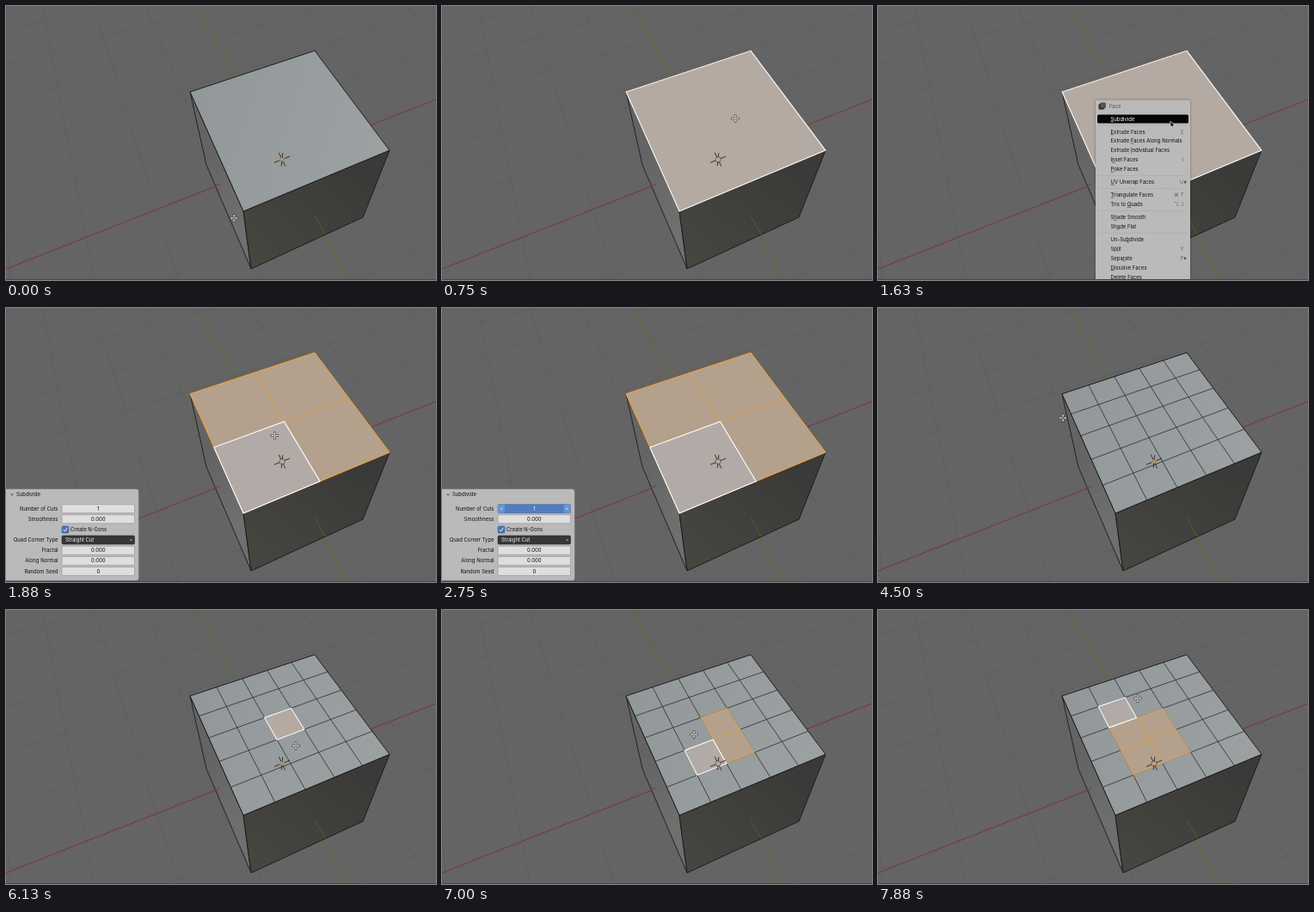
Recreate the animation shown at these times as an HTML page with a canvas. Size 500x319 px, loop 8 s.

```html
<!DOCTYPE html>
<html lang="en">
<head>
<meta charset="utf-8">
<title>Subdividing a cube face</title>
<style>
html, body { margin: 0; width: 100%; height: 100%; overflow: hidden; background: #646464; }
canvas { display: block; }
</style>
</head>
<body>
<canvas id="view" width="500" height="319"></canvas>
<script>
const ctx = document.getElementById('view').getContext('2d');
const LOOP = 8000, STEP = 125;

// Perspective: a plane is an anchor point plus the two shared vanishing points.
const VX = [2119, -530], VY = [-51, -495];
const plane = (o, a, b) => (u, v) =>
  [0, 1].map(k => (o[k] + a * u * VX[k] + b * v * VY[k]) / (1 + a * u + b * v));
const ground = plane([321, 179.4], .0375, .0876);
const lid = plane([276, 239], .1016, .2336);
const A = [214, 100], B = [359, 52], C = [446, 168], D = [276, 239];
const E = [233, 185], F = [415, 246], G = [285, 306];

function path(points, close) {
  ctx.beginPath();
  points.forEach(p => ctx.lineTo(...p));
  if (close) ctx.closePath();
}
function line(points, color, width = 1) {
  path(points);
  ctx.strokeStyle = color;
  ctx.lineWidth = width;
  ctx.stroke();
}
function poly(points, fill, stroke, width = 1) {
  path(points, true);
  if (fill) { ctx.fillStyle = fill; ctx.fill(); }
  if (stroke) { ctx.strokeStyle = stroke; ctx.lineWidth = width; ctx.stroke(); }
}
function box(x, y, w, h, r, fill, stroke) {
  ctx.beginPath();
  ctx.roundRect(x, y, w, h, r);
  ctx.fillStyle = fill;
  ctx.fill();
  if (stroke) { ctx.strokeStyle = stroke; ctx.lineWidth = .6; ctx.stroke(); }
}
function text(str, x, y, color = '#111', align = 'left') {
  ctx.font = '5.95px Inter, "DejaVu Sans", sans-serif';
  ctx.textBaseline = 'middle';
  ctx.textAlign = align;
  ctx.fillStyle = color;
  ctx.fillText(str, x, y + .3);
}
// The letter after "&" is underlined as the shortcut key.
function menuLabel(str, x, y, color = '#111') {
  const [before, after] = str.split('&');
  text(before + after, x, y, color);
  const left = x + ctx.measureText(before).width;
  line([[left, y + 3.2], [left + ctx.measureText(after[0]).width, y + 3.2]], color, .5);
}
function gradient(from, to, c1, c2) {
  const g = ctx.createLinearGradient(...from, ...to);
  g.addColorStop(0, c1);
  g.addColorStop(1, c2);
  return g;
}

// Mouse path: time, x, y
const mouse = [
  [0, 265, 247], [750, 341, 131], [1375, 341, 131], [1625, 340, 134], [1750, 340, 134],
  [2625, 146, 235], [3750, 146, 235], [4500, 215, 128], [4875, 262, 117], [5375, 318, 133],
  [5500, 318, 133], [6125, 337, 158], [6250, 311, 157], [6500, 300, 162], [6625, 300, 162],
  [7000, 293, 145], [7500, 285, 108], [7875, 302, 103], [LOOP, 302, 103]
];
function mouseAt(t) {
  const i = mouse.findIndex(k => k[0] > t);
  const [t0, x0, y0] = mouse[i - 1], [t1, x1, y1] = mouse[i];
  const f = (t - t0) / (t1 - t0);
  return [x0 + (x1 - x0) * f, y0 + (y1 - y0) * f];
}

// Time of each shift-click and the cell it adds
const picks = [[5625, 2, 2], [6250, 2, 1], [6750, 1, 1], [7125, 1, 2], [7500, 1, 3]];

function stateAt(t) {
  const divisions = t < 1875 ? 1 : t < 2875 ? 2 : t < 3250 ? 3 : t < 3750 ? 4 : 5;
  let cells = [];
  if (t >= 500 && t < 4250) {
    for (let i = divisions; i--;) for (let j = divisions; j--;) cells.push([i, j]);
  } else {
    cells = picks.filter(p => t >= p[0]).map(p => p.slice(1));
  }
  return {
    divisions, cells,
    menu: t >= 1000 && t < 1875,
    panel: t >= 1875 && t < 4250,
    pressed: [[2750, 2875], [3000, 3250], [3500, 3750]].some(([a, b]) => t >= a && t < b)
  };
}

function drawFloor() {
  ctx.fillStyle = '#646464';
  ctx.fillRect(0, 0, 500, 319);
  for (let i = -9; i <= 20; i++) {
    line([ground(i, -5), ground(i, 30)], 'rgba(80,80,80,.35)', .8);
    if (i >= -5) line([ground(-9, i), ground(20, i)], 'rgba(80,80,80,.35)', .8);
  }
  line([ground(-9, 0), ground(20, 0)], '#85303f');
  line([ground(0, -5), ground(0, 30)], '#567522');
}

function drawCube({ divisions: n, cells }) {
  poly([A, D, G, E], gradient([225, 180], [275, 250], '#646464', '#6e6f6f'), '#222');
  poly([D, C, F, G], gradient([400, 180], [300, 300], '#3a3a38', '#464540'), '#1c1c1c');
  poly([A, B, C, D], gradient(A, C, '#92989a', '#9ca1a2'));
  line([[243, 209.5], [249, 207.3]], '#7c3644');
  line([[359, 244.5], [371, 266]], '#4d6029');

  const quad = ([i, j]) =>
    [[i, j], [i + 1, j], [i + 1, j + 1], [i, j + 1]].map(([x, y]) => lid(x / n, y / n));
  for (let k = 1; k < n; k++) {
    line([lid(k / n, 0), lid(k / n, 1)], '#2b2d2e', .8);
    line([lid(0, k / n), lid(1, k / n)], '#2b2d2e', .8);
  }
  poly([A, B, C, D], null, '#1c1c1c');
  const active = cells[cells.length - 1];
  cells.slice(0, -1).forEach(c => poly(quad(c), '#b3a18d', '#dfa04f', .9));
  if (cells.length > 1 && cells.length === n * n) poly([A, B, C, D], null, '#efa03c');
  if (active) poly(quad(active), cells.length > 1 ? '#b2aaa6' : '#b5aaa2', '#fff', 1.1);
  return cells.some(c => {
    path(quad(c), true);
    return ctx.isPointInPath(321, 178.5);
  });
}

function drawOrigin(covered) {
  const [x, y] = [321, 178.7];
  [[9, -3.6], [3.8, 8], [-.8, 7.5]].forEach(([dx, dy]) => [1, -1].forEach(s =>
    line([[x + s * dx * .3, y + s * dy * .3], [x + s * dx, y + s * dy]], '#2a2422', .9)));
  ctx.beginPath();
  ctx.arc(x, y, covered ? 3.2 : 1.7, 0, 7);
  if (covered) {
    ctx.strokeStyle = 'rgba(125,55,45,.7)';
    ctx.lineWidth = .9;
    ctx.stroke();
  } else {
    ctx.fillStyle = '#eda945';
    ctx.fill();
    ctx.strokeStyle = '#6b4a25';
    ctx.lineWidth = .5;
    ctx.stroke();
  }
}

const menuRows = [
  [146.5, '&Extrude Faces', 'E'], [157, 'Extrude &Faces Along Normals'],
  [168, 'Extrude &Individual Faces'], [179, 'I&nset Faces', 'I'], [190, '&Poke Faces'],
  [205, '&UV Unwrap Faces', 'U', 1], [220, '&Triangulate Faces', '⌘ T'],
  [231, 'Tris to &Quads', '⌥ J'], [246, 'S&hade Smooth'], [256.7, 'Sh&ade Flat'],
  [271.7, 'Un-Su&bdivide'], [282.5, 'Sp&lit', 'Y'], [293.7, 'Sepa&rate', 'P', 1],
  [304.5, '&Dissolve Faces'], [315.5, 'Delete Fa&ces']
];
function drawMenu() {
  ctx.save();
  ctx.shadowColor = 'rgba(0,0,0,.4)';
  ctx.shadowBlur = 3;
  box(253, 109.5, 110, 220, 2, '#bababa');
  ctx.restore();
  box(256.5, 114, 6.5, 6.5, 1, '#333');
  box(258.5, 112.8, 6, 6, 1, '#555', '#333');
  text('Face', 269, 117, '#555');
  box(255, 126.5, 106, 10, 1.5, '#050505');
  menuLabel('&Subdivide', 270.5, 131.5, '#fff');
  [139, 197.5, 212.5, 238.5, 264.3].forEach(y => line([[256, y], [360, y]], '#adadad', .7));
  menuRows.forEach(([y, label, key, sub]) => {
    menuLabel(label, 270.5, y);
    if (key) text(key, 355.5, y, '#666', 'right');
    if (sub) poly([[356.3, y - 1.9], [359, y], [356.3, y + 1.9]], '#444');
  });
}

const panelRows = [
  [245.7, 'Smoothness', '0.000'], [282.2, 'Fractal', '0.000'],
  [294.4, 'Along Normal', '0.000'], [306.5, 'Random Seed', '0']
];
function chevron(x, y, dx, dy, color) {
  line([[x - dx - dy, y - dy - dx], [x + dx * .6, y + dy * .6], [x - dx + dy, y - dy + dx]], color, .7);
}
function drawField(y, label, value, pressed) {
  text(label, 60.5, y, '#111', 'right');
  box(65, y - 5, 84.5, 10, 1.5, pressed ? '#4f7dc0' : '#dedede', pressed ? '#446699' : '#8f8f8f');
  if (pressed) {
    box(65, y - 5, 8, 10, 1.5, '#6a94d2');
    box(141.5, y - 5, 8, 10, 1.5, '#6a94d2');
    chevron(69, y, -1, 0, '#fff');
    chevron(145.5, y, 1, 0, '#fff');
  }
  text(value, 107.3, y, pressed ? '#fff' : '#111', 'center');
}
function drawPanel(cuts, pressed) {
  box(-2, 211, 156, 106, 2.5, '#bababa', '#a5a5a5');
  chevron(7, 217.4, 0, 1.6, '#444');
  text('Subdivide', 12, 217.3);
  drawField(233.7, 'Number of Cuts', String(cuts), pressed);
  panelRows.forEach(row => drawField(...row));
  box(65, 254, 8, 8, 1.5, '#4772b3', '#3a5c90');
  line([[66.8, 258.2], [68.4, 260], [71.4, 255.8]], '#fff');
  text('Create N-Gons', 75, 258);
  text('Quad Corner Type', 60.5, 270, '#111', 'right');
  box(65, 265, 84.5, 10, 1.5, '#363636', '#2a2a2a');
  text('Straight Cut', 69, 270, '#f0f0f0');
  chevron(145.5, 270.4, 0, 1.2, '#ccc');
}

function drawPointer([x, y], arrow) {
  if (arrow) {
    poly([[0, 0], [0, 7], [1.7, 5.6], [2.9, 8.1], [4, 7.6], [2.9, 5.2], [5, 5]]
      .map(([a, b]) => [x + a, y + b]), '#000', '#eee', .7);
    return;
  }
  [['#333', 2.6, 4.6], ['#f4f4f4', 1.3, 4]].forEach(([color, width, r]) =>
    [[1, 0], [-1, 0], [0, 1], [0, -1]].forEach(([a, b]) =>
      line([[x + a * 1.2, y + b * 1.2], [x + a * r, y + b * r]], color, width)));
}

function frame(now) {
  const t = Math.floor((now % LOOP) / STEP) * STEP;
  const state = stateAt(t), pos = mouseAt(t);
  drawFloor();
  drawOrigin(drawCube(state));
  if (state.menu) drawMenu();
  if (state.panel) drawPanel(state.divisions - 1, state.pressed);
  const overPanel = state.panel && pos[0] < 154 && pos[1] > 211;
  if (!state.pressed) drawPointer(pos, state.menu || overPanel);
  line([[0, 318.5], [500, 318.5]], '#484848');
  requestAnimationFrame(frame);
}
requestAnimationFrame(frame);
</script>
</body>
</html>
```
